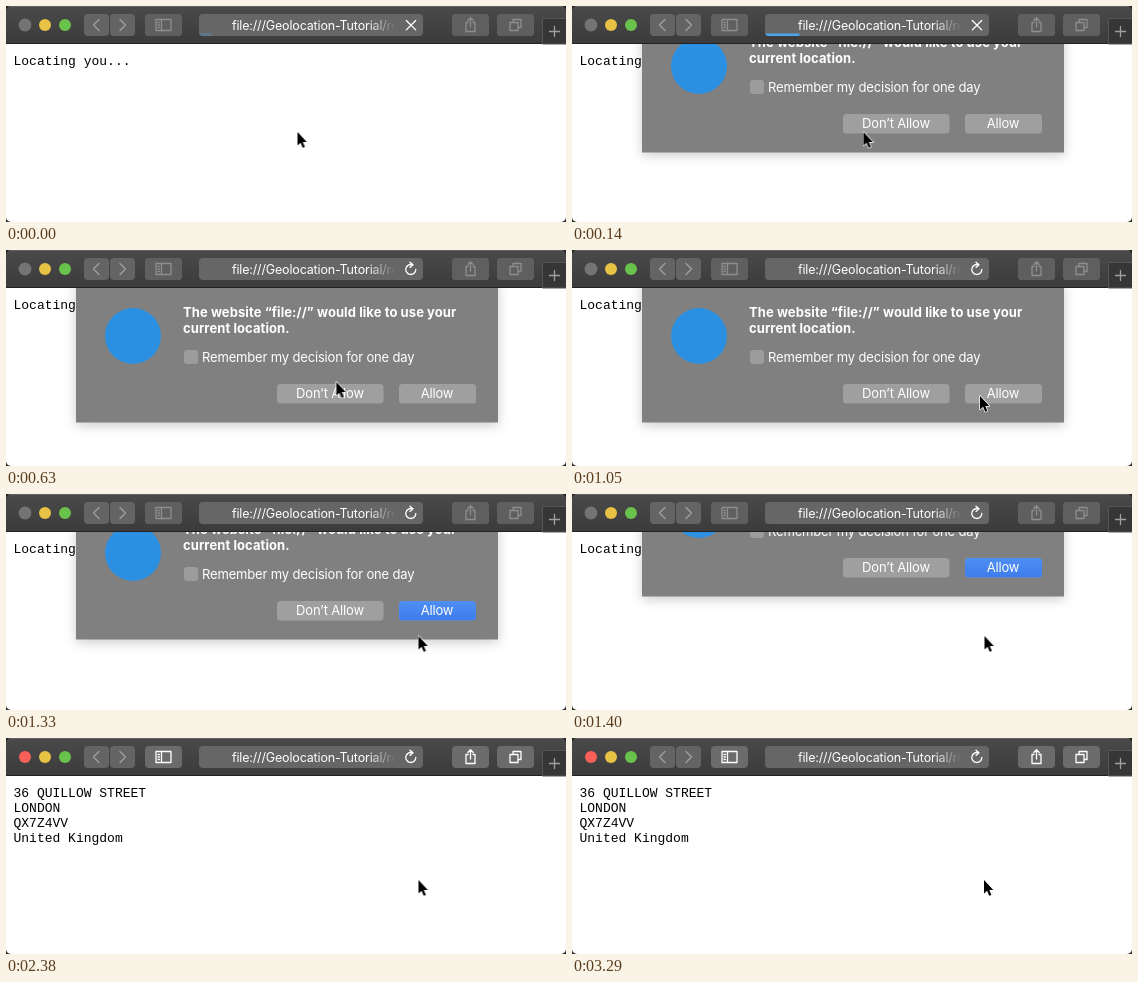
An HTML page that plays this animation: 560x216 px, repeating every 3.43 s.

```html
<!DOCTYPE html>
<html lang="en">
<head>
<meta charset="utf-8">
<title>Geolocation prompt</title>
<style>
  html, body { margin: 0; width: 100%; height: 100%; overflow: hidden; background: #222; }
  svg { display: block; width: 560px; height: 216px; }
  text { font: 13px Inter, "Open Sans", sans-serif; letter-spacing: -.16px; fill: #fff; }
  .page text { font: 13px "Liberation Mono", monospace; letter-spacing: 0; fill: #000; }
  .bold { font-weight: 700; letter-spacing: .08px; }
  .mid { text-anchor: middle; }
  .url { font-size: 12.5px; fill: url(#fade); }
  .line { fill: none; stroke: var(--ink, #fff); stroke-width: 1.3; stroke-linecap: round; stroke-linejoin: round; }
  .weak { --ink: #a0a0a0; }
  .btn { fill: var(--face, #6b6b6b); }
  .idle { --ink: #8e8e8e; --face: #5f5f5f; }

  /* 70 ms is 2.0408% of the loop */
  .idle, .loading, .loaded, .before, .after, .sheet, .pressed { animation: 3430ms step-end infinite; }
  .idle { animation-name: idle; }
  .loading { animation-name: loading; }
  .loaded { animation-name: loaded; }
  .before { animation-name: before; }
  .after { animation-name: after; }
  .sheet { animation-name: sheet; filter: drop-shadow(0 3px 6px rgba(0, 0, 0, .2)); }
  .pressed { animation-name: pressed; }
  .bar { transform-origin: 193px 0; animation: bar 3430ms linear infinite; }
  .cursor { animation: cursor 3430ms linear infinite; }

  @keyframes idle { 0% { opacity: 1 } 46.938%, 100% { opacity: 0 } }
  @keyframes loading { 0% { opacity: 1 } 16.326%, 100% { opacity: 0 } }
  @keyframes loaded { 0% { opacity: 0 } 16.326%, 100% { opacity: 1 } }
  @keyframes before { 0% { opacity: 1 } 67.346%, 100% { opacity: 0 } }
  @keyframes after { 0% { opacity: 0 } 67.346%, 100% { opacity: 1 } }
  @keyframes pressed { 0% { opacity: 0 } 34.693%, 100% { opacity: 1 } }
  @keyframes sheet {
    0% { transform: translateY(-160px) }
    2.04% { transform: translateY(-88px) }
    4.081% { transform: translateY(-26px) }
    6.122% { transform: none }
    36.734% { transform: translateY(-6px) }
    38.775% { transform: translateY(-27px) }
    40.816% { transform: translateY(-70px) }
    42.857% { transform: translateY(-113px) }
    44.897%, 100% { transform: translateY(-160px) }
  }
  @keyframes bar {
    0% { transform: scaleX(.058); opacity: .35; animation-timing-function: step-end }
    2.04% { transform: scaleX(.11); opacity: 1 }
    6.122%, 8.16% { transform: scaleX(.196) }
    14.285% { transform: scaleX(1); opacity: 1; animation-timing-function: step-end }
    16.326%, 100% { transform: scaleX(1); opacity: 0 }
  }
  @keyframes cursor {
    0% { transform: translate(291.5px, 126px); animation-timing-function: step-end }
    6.122% { transform: translate(291.5px, 125px) }
    10.204% { transform: translate(291.5px, 125px); animation-timing-function: ease-in-out }
    30.612% { transform: translate(408px, 146px); animation-timing-function: step-end }
    32.653% { transform: translate(411px, 143px) }
    38.775% { transform: translate(412.5px, 142px); animation-timing-function: step-end }
    95.918%, 100% { transform: translate(412px, 142px); animation-timing-function: step-end }
  }
</style>
</head>
<body>
<svg viewBox="0 0 560 216">
  <defs>
    <linearGradient id="chrome" x2="0" y2="1">
      <stop stop-color="#4a4a4a"/><stop offset="1" stop-color="#3b3b3b"/>
    </linearGradient>
    <linearGradient id="blue" x2="0" y2="1">
      <stop stop-color="#4f8ff2"/><stop offset="1" stop-color="#3d7cec"/>
    </linearGradient>
    <linearGradient id="fade" gradientUnits="userSpaceOnUse" x1="362" x2="389" y1="0" y2="0">
      <stop stop-color="#fff"/><stop offset="1" stop-color="#fff" stop-opacity="0"/>
    </linearGradient>
    <clipPath id="below"><path d="M0 38H560V216H0Z"/></clipPath>
    <clipPath id="field"><rect x="193" y="8" width="224" height="22" rx="4"/></clipPath>
    <clipPath id="window"><rect width="560" height="216" rx="5"/></clipPath>
    <g id="tools">
      <rect class="btn" x="139" y="8" width="37" height="22" rx="4"/>
      <rect class="btn" x="446" y="8" width="37" height="22" rx="4"/>
      <rect class="btn" x="491" y="8" width="37" height="22" rx="4"/>
      <path class="line" d="M150 13.5H165V24.5H150ZM155.5 13.5V24.5M152 16.5H153.5M152 19H153.5M152 21.5H153.5"/>
      <path class="line" d="M462 16.5H460V25.5H469V16.5H467M464.5 21V12M461.8 14.5L464.5 11.8 467.2 14.5"/>
      <path class="line" d="M504 16.5H512V24.5H504ZM507 16V13.5H515V21.5H512.5"/>
    </g>
  </defs>

  <g clip-path="url(#window)">
    <path fill="#fff" d="M0 38H560V216H0Z"/>
    <g class="page">
      <text class="before" x="7.5" y="58.5">Locating you...</text>
      <g class="after">
        <text x="7.5" y="58.5">36 QUILLOW STREET</text>
        <text x="7.5" y="73.5">LONDON</text>
        <text x="7.5" y="88.5">QX7Z4VV</text>
        <text x="7.5" y="103.5">United Kingdom</text>
      </g>
    </g>

    <g clip-path="url(#below)">
      <g class="sheet">
        <path fill="#808080" d="M70 30H492V172.5H70Z"/>
        <circle cx="127" cy="86" r="28" fill="#2b8fe2"/>
        <text class="bold" x="177" y="67">The website “file://” would like to use your</text>
        <text class="bold" x="177" y="83">current location.</text>
        <rect x="178" y="100" width="14" height="14" rx="3" fill="#9c9c9c"/>
        <text x="196" y="112">Remember my decision for one day</text>
        <rect x="271" y="134" width="106.5" height="19.5" rx="3.5" fill="#9f9f9f"/>
        <rect x="393" y="134" width="77" height="19.5" rx="3.5" fill="#9f9f9f"/>
        <rect class="pressed" x="393" y="134" width="77" height="19.5" rx="3.5" fill="url(#blue)"/>
        <text class="mid" x="324" y="148">Don’t Allow</text>
        <text class="mid" x="431" y="148">Allow</text>
      </g>
    </g>

    <path fill="url(#chrome)" d="M0 0H560V38H0Z"/>
    <path fill="#626262" d="M0 0H560V1H0Z"/>
    <path fill="#222" d="M0 37H560V38H0Z"/>
    <circle cx="19" cy="19" r="6" fill="#f9605a"/>
    <circle class="idle" cx="19" cy="19" r="6.4" fill="#747474"/>
    <circle cx="39" cy="19" r="6" fill="#e7c244"/>
    <circle cx="59" cy="19" r="6" fill="#68c24c"/>

    <rect x="78" y="8" width="25" height="22" rx="4" fill="#646464"/>
    <rect x="104" y="8" width="25" height="22" rx="4" fill="#646464"/>
    <path class="line weak" d="M93 13.5L87.5 19 93 24.5M114 13.5L119.5 19 114 24.5"/>
    <use href="#tools"/>
    <g class="idle"><use href="#tools"/></g>

    <rect x="193" y="8" width="224" height="22" rx="4" fill="#666"/>
    <g clip-path="url(#field)">
      <path class="bar" fill="#4ba5ea" d="M193 27.5H417V30H193Z"/>
    </g>
    <text class="url" x="226" y="23.5">file:///Geolocation-Tutorial/re</text>
    <path class="line loading" d="M400.3 14.5L409.7 23.9M409.7 14.5L400.3 23.9"/>
    <path class="line loaded" d="M406.5 14.8A5 5 0 1 0 409.8 19.5M404 12.2L407 14.8 404 17.4"/>

    <path fill="#363636" stroke="#555" d="M536.5 12.5H561V38H536.5Z"/>
    <path class="line weak" d="M543.5 25.5H553.5M548.5 20.5V30.5"/>

    <path class="cursor" d="M0 0V13.6L3.1 10.8 5.2 15.8 7.4 14.9 5.3 10H9.3Z" stroke="#fff" stroke-width="1.4" stroke-linejoin="round" paint-order="stroke"/>
  </g>
</svg>
</body>
</html>
```
